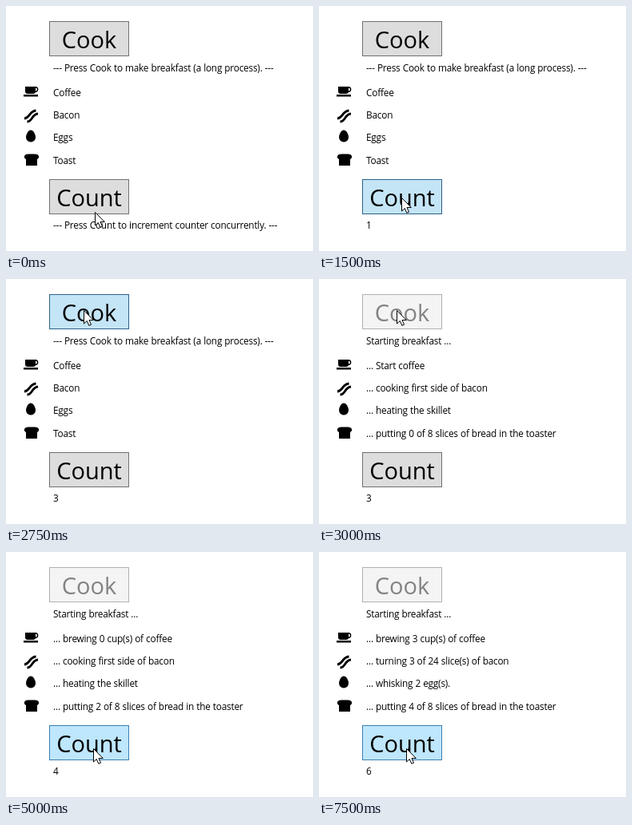
Recreate the animation shown at these times as an HTML page. Size 384 by 307 pixels, loop 8 s.

```html
<!DOCTYPE html>
<html lang="en">
<head>
<meta charset="utf-8">
<title>Asynchronous breakfast</title>
<style>
  html, body { margin: 0; width: 100%; height: 100%; overflow: hidden; background: #fff; }
  svg { display: block; }
  text { font: 11.8px "Open Sans", "Noto Sans", sans-serif; letter-spacing: -.2px; word-spacing: .3px; }
  .button rect { fill: #ddd; stroke: #707070; }
  .button text { font-size: 29px; letter-spacing: 0; text-anchor: middle; }
  .hover rect { fill: #bee6fd; stroke: #3c7fb1; }
  .pressed rect { fill: #c4e5f6; stroke: #2c628b; }
  .disabled rect { fill: #f4f4f4; stroke: #adb2b5; }
  .disabled text { fill: #838383; }
</style>
</head>
<body>
<svg width="384" height="307" viewBox="0 0 384 307">
  <g id="cook"><rect x="54.5" y="19.5" width="99" height="43"/><text x="104" y="53">Cook</text></g>
  <g id="count"><rect x="54.5" y="217.5" width="99" height="43"/><text x="104" y="251">Count</text></g>

  <path d="M24 101H37C41.500 101 41.500 108 37 108Q36.500 110 34 110H27Q24 110 24 107ZM37 102.500V106.500C39.500 106.500 39.500 102.500 37 102.500ZM22 111H40V113.500H22Z" fill-rule="evenodd"/>
  <g fill="none" stroke="#000" stroke-width="2.8">
    <path d="M23 141C30 140.500 29 131.500 37.500 131"/>
    <path d="M26.500 145C33.500 144.500 32 135.500 40 135"/>
  </g>
  <path d="M31 155.500C34 155.500 37 160.500 37 164.500A6 6 0 0 1 25 164.500C25 160.500 28 155.500 31 155.500Z"/>
  <path d="M28 185.500H36C42 185.500 42.500 190.500 39 192V200H25V192C21.500 190.500 22 185.500 28 185.500Z"/>

  <text id="status" x="59" y="82"/>
  <text id="coffee" x="59" y="113"/>
  <text id="bacon" x="59" y="141"/>
  <text id="eggs" x="59" y="169"/>
  <text id="toast" x="59" y="198"/>
  <text id="counter" x="59" y="279"/>
  <path id="cursor" d="M.5 .5V17L4.300 13.500L6.800 19.300L9.500 18.200L7 12.500H12.300Z" fill="#fff" stroke="#000"/>
</svg>
<script>
const LOOP = 8000;
const events = [];
const at = (time, changes) => events.push({ time, changes });
const every = (start, step, id, label) => {
  for (let n = 0, t = start; t < LOOP; t += step, n++) at(t, { [id]: label(n) });
};
const click = (time, counter) => {
  at(time, { count: 'pressed' });
  at(time + 250, { count: 'hover', counter });
};

at(0, {
  cook: '', count: '', cursor: [111, 258],
  status: '--- Press Cook to make breakfast (a long process). ---',
  coffee: 'Coffee', bacon: 'Bacon', eggs: 'Eggs', toast: 'Toast',
  counter: '--- Press Count to increment counter concurrently. ---'
});
at(250, { count: 'hover', cursor: [106, 251] });
at(500, { cursor: [102, 245] });
click(750, 1);
at(1500, { cursor: [103, 240] });
click(1500, 2);
click(2000, 3);
at(2500, { count: '', cook: 'hover', cursor: [97, 39] });
at(2750, { cook: 'pressed' });
at(3000, {
  cook: 'disabled', status: 'Starting breakfast ...', coffee: '... Start coffee',
  bacon: '... cooking first side of bacon', eggs: '... heating the skillet'
});
at(3250, { cursor: [100, 95] });
at(3500, { cursor: [106, 190] });
at(3750, { count: 'hover', cursor: [109, 246] });
click(4750, 4);
click(5750, 5);
click(6750, 6);
every(3000, 1000, 'toast', n => `... putting ${n} of 8 slices of bread in the toaster`);
every(4500, 1000, 'coffee', n => `... brewing ${n} cup(s) of coffee`);
every(6000, 500, 'bacon', n => `... turning ${n} of 24 slice(s) of bacon`);
every(6500, 500, 'eggs', n => `... whisking ${n} egg(s).`);
events.sort((a, b) => a.time - b.time);

const $ = id => document.getElementById(id);
const start = performance.now();

function draw() {
  const now = (performance.now() - start) % LOOP;
  const state = Object.assign({}, ...events.filter(e => e.time <= now).map(e => e.changes));
  for (const [id, value] of Object.entries(state)) {
    if (id === 'cursor') $(id).setAttribute('transform', `translate(${value})`);
    else if (id === 'cook' || id === 'count') $(id).setAttribute('class', `button ${value}`);
    else $(id).textContent = value;
  }
  requestAnimationFrame(draw);
}
draw();
</script>
</body>
</html>
```
